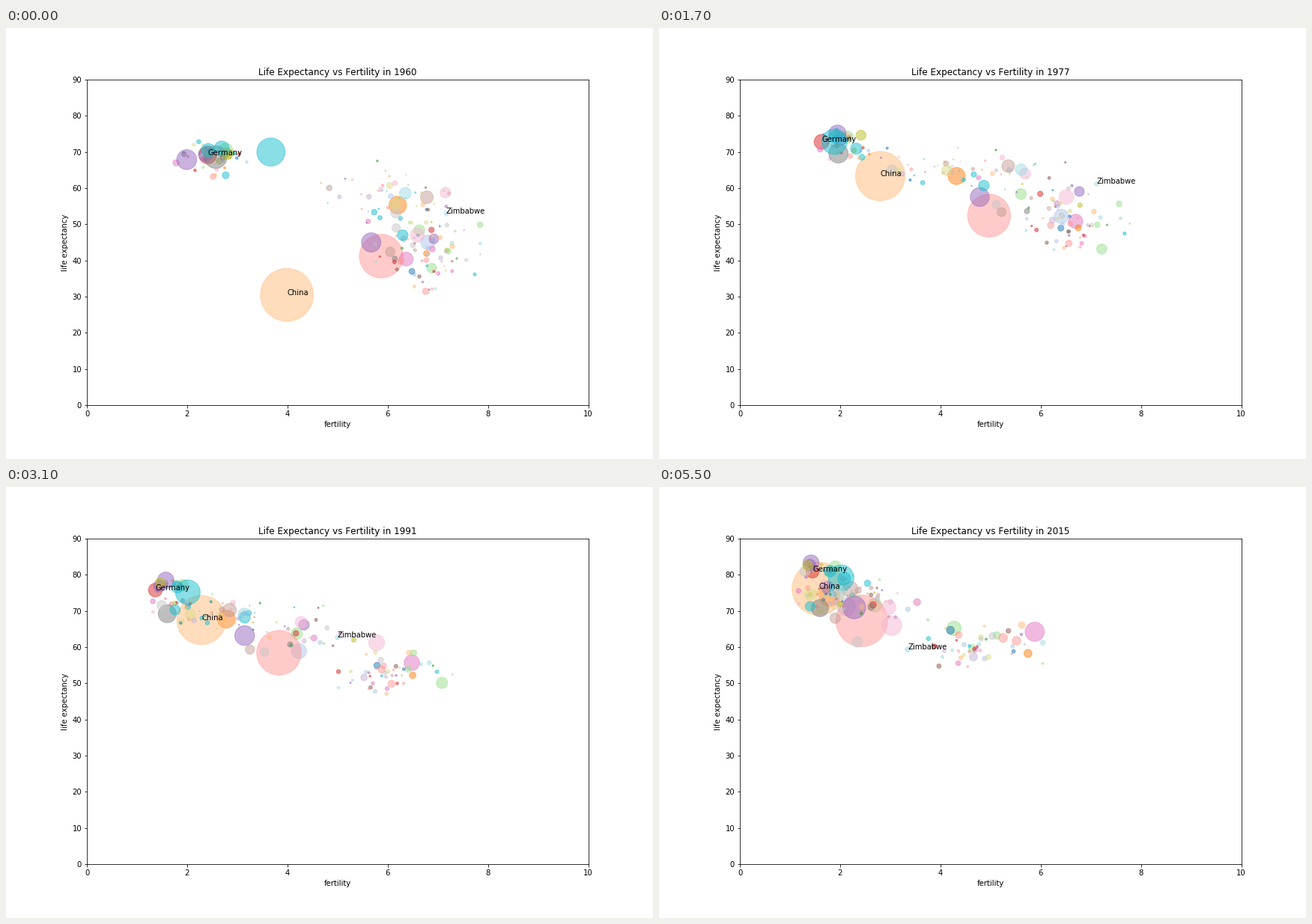
A matplotlib script that plays this animation: 864 by 576 pixels, repeating every 5.6 s.

```python
import numpy as np
import matplotlib.pyplot as plt
from matplotlib.animation import FuncAnimation

plt.rcParams["text.kerning_factor"] = 6

YEARS = np.arange(1960, 2016)
S = (YEARS - 1960) / 55
CHINA_POP = 658 + 718 * (1 - (1 - S) ** 1.43)  # millions
TAB = plt.get_cmap("tab20").colors
(BLUE, LBLUE, ORANGE, LORANGE, GREEN, LGREEN, RED, LRED, PURPLE, LPURPLE,
 BROWN, LBROWN, PINK, LPINK, GRAY, LGRAY, OLIVE, LOLIVE, CYAN, LCYAN) = range(20)

names, colors, fert, life, area = [], [], [], [], []
rng = np.random.default_rng(7)


def path(*points):
    """Yearly values through a few (year, value) points."""
    return np.interp(YEARS, *zip(*points))


def bell(year, width):
    return np.exp(-((YEARS - year) / width) ** 2)


def decline(start, end, mid, width=7):
    """Fertility: S-shaped fall, steepest in the year mid."""
    s = 1 / (1 + np.exp((mid - YEARS) / width))
    return start + (end - start) * (s - s[0]) / (s[-1] - s[0])


def rise(start, end, ease=.72):
    """Life expectancy: growth that slows down when ease is below 1."""
    return start + (end - start) * S ** ease


def add(name, col, pop, f, l):
    """Bubble area is the population relative to the largest country."""
    p = pop[0] * (pop[1] / pop[0]) ** S
    names.append(name)
    colors.append(TAB[col])
    fert.append(f)
    life.append(l)
    area.append(5000 * p / CHINA_POP)


def crowd(n, f0, f1, l0, l1, mid, pop, growth, dip=0):
    """Smaller countries; f0 to mid are (mean, spread), pop is a log range."""
    for _ in range(n):
        a, b, p, q, m = (u + s * np.clip(rng.normal(), -1.9, 1.9)
                         for u, s in (f0, f1, l0, l1, mid))
        p0 = np.exp(rng.uniform(*np.log(pop)))
        sag = dip * rng.uniform() ** 2 * bell(2001, 9)
        add("", rng.integers(20), (p0, p0 * growth),
            decline(a, b, m, rng.uniform(5, 9)), rise(p, q) - sag)


add("Bangladesh", LBLUE, (48, 161), decline(6.8, 2.12, 1990, 5.5), rise(45, 71.2, 1.1))
add("Brazil", ORANGE, (72, 206), decline(6.2, 1.79, 1976, 11), rise(55.3, 74.1))
add("China", LORANGE, (658, 1376),
    path((1960, 3.99), (1961, 3.28), (1963, 7.4), (1964, 6.1), (1970, 5.75),
         (1972, 4.92), (1977, 2.8), (1987, 2.7), (1991, 2.285), (1999, 1.45),
         (2015, 1.57)),
    path((1960, 30.5), (1963, 50), (1972, 61.4), (1982, 65.3), (1999, 69.5),
         (2015, 76.2)))
add("Egypt", LGREEN, (27, 93), decline(6.63, 2.69, 1986, 11), rise(48.4, 71.6))
add("Ethiopia", LGREEN, (22, 100), decline(6.87, 4.27, 2006, 5) + .5 * bell(1984, 12),
    rise(37.9, 65.2, 1.4))
add("France", LGREEN, (46, 64), decline(2.77, 1.9, 1973, 4), rise(70.5, 82.3, 1))
add("Germany", RED, (73, 81), decline(2.41, 1.45, 1971, 4) - .1 * bell(1994, 10),
    rise(69.2, 80.9, 1))
add("India", LRED, (449, 1310), decline(5.87, 2.43, 1987, 13), rise(41.2, 67.3))
add("Indonesia", PURPLE, (88, 258), decline(5.67, 2.28, 1983.5), rise(45, 71, .62))
add("Iran", PURPLE, (22, 79), decline(6.92, 1.75, 1991, 4), rise(46, 76.5))
add("Italy", PURPLE, (50, 60), decline(2.37, 1.4, 1979, 4), rise(69.4, 82.8, 1))

# Western and Eastern Europe, then the Americas, islands and Asia
crowd(18, (2.5, .3), (1.7, .2), (70, 1.5), (81.3, 1), (1973, 3), (.3, 14), 1.3)
crowd(15, (2.6, .5), (1.55, .2), (66.5, 2), (75.5, 1.8), (1984, 6), (1, 12), 1.2)
crowd(42, (6, .7), (2.2, .35), (59, 4.5), (75, 2.5), (1979, 6), (.1, 10), 2.6)
crowd(22, (6.9, .4), (2.8, .5), (48, 5), (73, 3), (1987, 5), (.3, 9), 3)

add("Japan", PURPLE, (93, 127), decline(1.99, 1.42, 1984) + .15 * bell(1973, 6),
    rise(67.9, 83.3, .65))
add("Mexico", LBROWN, (38, 126), decline(6.78, 2.2, 1981, 5.5), rise(57.5, 76, .65))
add("Myanmar", LBROWN, (21, 53), decline(6.05, 1.9, 1986), rise(42.4, 68))
add("Nigeria", PINK, (45, 181), decline(6.35, 5.88, 2005) + .4 * bell(1981, 12),
    rise(40.4, 64.7) - 3.5 * bell(2002, 9))

# Africa: late decline, and a setback in life expectancy around 2000
crowd(46, (6.8, .55), (4.9, .6), (41, 5), (60.5, 3), (1995, 5), (.4, 10), 3.9, 9)

add("Pakistan", LPINK, (46, 189), decline(6.59, 3.03, 1998, 5.5), rise(47, 66, .5))
add("Philippines", LPINK, (26, 101), decline(7.15, 2.97, 1980, 13), rise(58.8, 71))
add("Russia", GRAY, (120, 144), decline(2.57, 1.6, 1970, 8) - .4 * bell(2000, 7),
    rise(68.6, 71) - 4.5 * bell(2001, 8))
add("South Africa", LGRAY, (17, 55), decline(6.17, 2.34, 1984, 9),
    rise(49, 64) - 9 * bell(2006, 8))
add("South Korea", LGRAY, (25, 50), decline(6.16, 1.3, 1973, 5.5), rise(53.2, 81))
add("Spain", OLIVE, (30, 46), decline(2.8, 1.35, 1981, 4), rise(69.5, 82.7, .8))
add("Thailand", LOLIVE, (27, 68), decline(6.15, 1.4, 1978), rise(55.5, 74.6, .6))
add("Turkey", CYAN, (27, 79), decline(6.3, 2.08, 1981, 9), rise(47, 79))
add("Ukraine", CYAN, (43, 45), decline(2.42, 1.4, 1988, 5), rise(70.5, 71.5) - 4 * bell(2001, 8))
add("United Kingdom", CYAN, (52, 65), decline(2.69, 1.8, 1971, 3), rise(71, 81, 1))
add("United States", CYAN, (186, 321), decline(3.67, 2.02, 1966, 2.5) - .2 * bell(1980, 6),
    rise(70, 79.2, 1))
add("Vietnam", LCYAN, (33, 94), decline(6.35, 1.96, 1985.5, 5.5), rise(58.6, 75.3, .8))
add("Zimbabwe", LCYAN, (3.7, 15),
    path((1960, 7.165), (1972, 7.42), (1982, 6.81), (1991, 5), (1999, 4.11),
         (2007, 3.9), (2015, 3.35)),
    path((1960, 53), (1982, 63.6), (1991, 62.7), (1999, 49.3), (2003, 44.5),
         (2007, 46.4), (2015, 59.4)))

fert, life, area = map(np.array, (fert, life, area))

fig, ax = plt.subplots(figsize=(12, 8), dpi=72)
fig.subplots_adjust(left=.125, right=.9, bottom=.125, top=.88)
ax.set(xlim=(0, 10), ylim=(0, 90), xlabel="fertility", ylabel="life expectancy")
title = ax.set_title("")
dots = ax.scatter(fert[:, 0], life[:, 0], s=area[:, 0], c=colors, alpha=.5)
texts = {names.index(n): ax.text(0, 0, n) for n in ("China", "Germany", "Zimbabwe")}


def update(n):
    dots.set_offsets(np.column_stack((fert[:, n], life[:, n])))
    dots.set_sizes(area[:, n])
    for i, text in texts.items():
        text.set_position((fert[i, n], life[i, n]))
    title.set_text(f"Life Expectancy vs Fertility in {YEARS[n]}")
    return [dots, title, *texts.values()]


anim = FuncAnimation(fig, update, frames=len(YEARS), interval=100,
                     repeat=True, repeat_delay=0)
plt.show()
```
